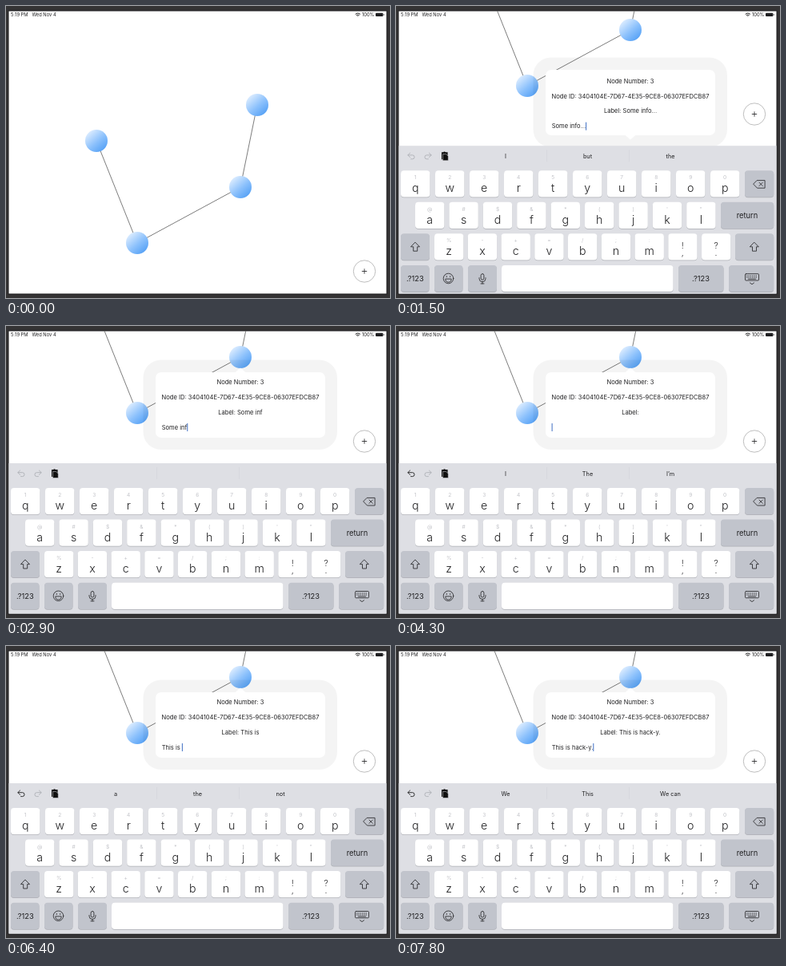
Animation of 480 by 366 pixels, one loop 8000 ms. Source, as an HTML page:

```html
<!DOCTYPE html>
<html lang="en">
<head>
<meta charset="utf-8">
<title>Node label editor</title>
<style>
  html, body { margin: 0; width: 100%; height: 100%; overflow: hidden; background: #343334; }
  svg { display: block; width: 100%; height: 100%; font-family: Inter, Roboto, sans-serif; fill: #202022; }
  .mid { text-anchor: middle; }
  .line { fill: none; stroke: #2a2a2c; stroke-linecap: round; stroke-linejoin: round; }
  #status { font-size: 5.75px; }
  #links { fill: none; stroke: #444; stroke-width: .7; }
  #content { font-size: 7.57px; }
  #hints { font-size: 6.6px; fill: #c2c3c8; }
  #letters { font-size: 14.2px; font-weight: 300; }
  #words { font-size: 7.3px; }
  .label { font-size: 9.3px; }
</style>
</head>
<body>
<svg viewBox="0 0 480 366">
  <defs>
    <linearGradient id="ball" x1=".1" y1=".08" x2=".85" y2=".95">
      <stop offset="0" stop-color="#e3f0ff"/>
      <stop offset=".55" stop-color="#8cc1fc"/>
      <stop offset="1" stop-color="#529ff5"/>
    </linearGradient>
    <clipPath id="screen"><rect x="3.5" y="6.5" width="472" height="354"/></clipPath>
    <clipPath id="cardClip"><rect x="187" width="212" height="82" rx="7"/></clipPath>
  </defs>
  <rect width="480" height="366" fill="#343334"/>
  <rect x="2.5" y="5.5" width="474" height="356" fill="#1d1d1e"/>
  <g clip-path="url(#screen)">
    <rect x="3" y="6" width="473" height="355" fill="#fff"/>
    <g id="scene">
      <path id="links"/>
      <g id="nodes" fill="url(#ball)"></g>
      <circle cx="448" cy="332.5" r="13.7" fill="#fff" stroke="#a8a8a8" stroke-width=".75"/>
      <path class="line" stroke-width=".85" d="M445.2 332.5h5.6M448 329.7v5.6"/>
    </g>

    <g id="popover">
      <rect x="171.5" y="-15.5" width="242.5" height="112.5" rx="22" fill="#000" opacity=".045"/>
      <path id="arrow" fill="#fff"/>
      <rect x="187" width="212" height="82" rx="7" fill="#fff"/>
      <g clip-path="url(#cardClip)">
        <g id="content">
          <text class="mid" x="293" y="15.4">Node Number: 3</text>
          <text class="mid" x="293" y="34">Node ID: 3404104E-7D67-4E35-9CE8-06307EFDCB87</text>
          <text class="mid" x="293" y="52.7" id="label"></text>
          <text x="194.7" y="71.8" id="field"></text>
          <rect id="caret" y="64" width="1" height="10" fill="#3f6fc4"/>
        </g>
      </g>
    </g>

    <g id="keyboard">
      <rect x="3" y="172" width="473" height="190" fill="#dedfe4"/>
      <path d="M188.5 177v15M291.5 177v15" stroke="#d5d6db" stroke-width=".7"/>
      <path id="undo" class="line" stroke-width=".9" d="M17.6 181l-2.8 2.7 2.8 2.7M15 183.7h5.6a2.4 2.4 0 0 1 0 4.9h-2"/>
      <path class="line" style="stroke:#aeb0b6" stroke-width=".9" d="M41.4 181l2.8 2.7-2.8 2.7M44 183.7h-5.6a2.4 2.4 0 0 0 0 4.9h2"/>
      <path d="M57 180h2q1.5-1.3 3 0h2.6v9h-7.6z" fill="#111"/>
      <path d="M58.5 182.5h4.2l2.6 2.6v5.4h-6.8z" fill="#111" stroke="#dedfe4" stroke-width=".5"/>
      <g id="words" class="mid"></g>
      <g id="keys"></g>
      <g id="hints" class="mid"></g>
      <g id="letters" class="mid"></g>
      <g class="mid label">
        <text x="439" y="263">return</text>
        <text x="23.8" y="341.8">.?123</text>
        <text x="381" y="341.8">.?123</text>
      </g>
      <g class="line" stroke-width=".85">
        <path d="M451.5 215.4h9.6v9.6h-9.6l-4.6-4.8zM454 218l4.3 4.3m0-4.3l-4.3 4.3"/>
        <path d="M24.2 293.2l5.3 5.4h-2.8v5.4h-5v-5.4h-2.8z"/>
        <path d="M448 293.2l5.3 5.4h-2.8v5.4h-5v-5.4h-2.8z"/>
        <circle cx="65.5" cy="338.3" r="6.3"/>
        <path d="M61.8 339.3a3.7 3.7 0 0 0 7.4 0zM63.3 335.5v1M67.7 335.5v1"/>
        <rect x="106.1" y="332.5" width="3.8" height="7.5" rx="1.9"/>
        <path d="M104 337.5v1a4 4 0 0 0 8 0v-1M108 342.5v2.3M106 344.8h4"/>
        <rect x="436.5" y="332.5" width="17" height="8.3" rx="1"/>
        <path d="M438.5 335h13M438.5 337h13" stroke-dasharray=".5 1.8"/>
        <path d="M440.5 339h9M442.5 343.8l2.5 1.8 2.5-1.8"/>
      </g>
    </g>

    <g id="status">
      <text x="6" y="13">5:19 PM</text>
      <text x="32.5" y="13">Wed Nov 4</text>
      <path class="line" stroke-width="1" d="M437 10q2.8-2.4 5.6 0M438.3 11.5q1.5-1.2 3 0M439.8 12.8v.1"/>
      <text x="445" y="13">100%</text>
      <rect x="462" y="8.8" width="9.4" height="4.3" rx="1.1"/>
      <rect x="471.9" y="10.1" width=".7" height="1.6"/>
    </g>
  </g>
</svg>

<script>
const LOOP = 8000, STEP = 100;
const $ = id => document.getElementById(id);

function add(parent, tag, attrs, text) {
  const el = document.createElementNS("http://www.w3.org/2000/svg", tag);
  for (const name in attrs) el.setAttribute(name, attrs[name]);
  if (text) el.textContent = text;
  parent.append(el);
  return el;
}

const nodes = [[113, 169], [164, 297], [293, 227], [314, 124]];
$("links").setAttribute("d", "M" + nodes.join("L"));
for (const [cx, cy] of nodes) add($("nodes"), "circle", { cx, cy, r: 14 });

function addKey(x, y, width, fill = "#fff") {
  add($("keys"), "rect", { x, y: y + .9, width, height: 33.2, rx: 4, fill: "#adafb5" });
  return add($("keys"), "rect", { x, y, width, height: 33.2, rx: 4, fill });
}

const GREY = "#c1c4cc";
const letters = [];
const rows = [
  { keys: "qwertyuiop", hints: "1234567890", x: 6, y: 203, pitch: 43 },
  { keys: "asdfghjkl", hints: "@#$&*()'\"", x: 24, y: 242.5, pitch: 42.4 },
  { keys: "zxcvbnm", hints: "%-+=/;:", x: 48, y: 282, pitch: 41.75 }
];
for (const { keys, hints, x, y, pitch } of rows) {
  [...keys].forEach((key, i) => {
    const left = x + i * pitch, mid = left + 18.2;
    addKey(left, y, 36.4);
    add($("hints"), "text", { x: mid, y: y + 11.3 }, hints[i]);
    letters.push(add($("letters"), "text", { x: mid, y: y + 27 }, key));
  });
}
[["!", ","], ["?", "."]].forEach(([upper, lower], i) => {
  const left = 340.3 + i * 41.75, x = left + 18;
  addKey(left, 282, 36.2);
  add($("letters"), "text", { x, y: 301, "font-size": 10.5 }, upper);
  add($("letters"), "text", { x, y: 310, "font-size": 10.5 }, lower);
});
addKey(436, 203, 36.2, GREY);
addKey(406, 242.5, 66.2, GREY);
const shifts = [addKey(6, 282, 36, GREY), addKey(424, 282, 48.2, GREY)];
for (const [x, width] of [[6, 35.5], [48, 35.5], [90, 36], [353, 56.5], [416, 56.2]]) addKey(x, 321.7, width, GREY);
addKey(132, 321.7, 214.5);

const words = [137, 239.5, 343].map(x => add($("words"), "text", { x, y: 187.6 }));

// Timelines of [time, value]
const typed = [
  [0, "Some info..."], [2300, "Some info.."], [2700, "Some info."], [2800, "Some info"],
  [2900, "Some inf"], [3000, "Some in"], [3200, "Some i"], [3400, "Some "], [3500, "Some"],
  [3600, "Som"], [4000, "So"], [4100, "S"], [4300, ""], [4700, "T"], [4900, "Th"],
  [5000, "Thi"], [5100, "This"], [5300, "This "], [5800, "This i"], [6000, "This is"],
  [6200, "This is "], [6500, "This is h"], [6700, "This is ha"], [7000, "This is hac"],
  [7100, "This is hack"], [7300, "This is hack-"], [7400, "This is hack-y"], [7500, "This is hack-y."]
];
const suggested = [
  [0, "I,but,the"], [2300, ",,"], [3400, "I,but,the"], [3600, ",,"], [4300, "I,The,I’m"],
  [4700, ",,"], [5100, "This,This’s,Thistle"], [5400, "is,app,game"], [5800, "is,in,it"],
  [6200, "a,the,not"], [6500, "had,have,has"], [7100, "hack,hacks,hacked"],
  [7300, ",,"], [7600, "We,This,We can"]
];
const sceneShift = [[1100, 0], [1200, -35], [1300, -105], [1400, -168], [1500, -197], [1600, -200], [1900, -188]];
const keyboardDrop = [[1100, 190], [1200, 162], [1300, 99], [1400, 30], [1500, 3.2], [1600, 0]];
const contentDrop = [[1100, 0], [1200, 35], [1300, 15], [1400, 6], [1500, 1.7], [1700, 0]];
const cardTop = [[1100, 125], [1200, 80], [1600, 80], [1800, 58]];

const held = (track, t) => track.findLast(([time]) => time <= t)[1];
function tween(track, t) {
  const next = track.findIndex(([time]) => time > t);
  if (next < 0) return track.at(-1)[1];
  if (next === 0) return track[0][1];
  const [[t0, a], [t1, b]] = track.slice(next - 1, next + 1);
  return a + (b - a) * (t - t0) / (t1 - t0);
}
const moveY = (id, y) => $(id).setAttribute("transform", `translate(0 ${y})`);
const within = (t, from, to) => t >= from && t < to;

function render(t) {
  moveY("scene", tween(sceneShift, t));
  moveY("keyboard", tween(keyboardDrop, t));
  moveY("popover", tween(cardTop, t));
  moveY("content", tween(contentDrop, t));
  $("popover").style.opacity = tween([[0, 0], [200, 1]], t);
  $("arrow").setAttribute("d", t < 1700 ? "M286 81.5L293 87.5L300 81.5z" : "M286 .5L293 -5.5L300 .5z");

  const text = held(typed, t);
  $("label").textContent = "Label: " + text;
  $("field").textContent = text.replace(/ /g, "\u00a0");
  $("caret").setAttribute("x", 194.6 + $("field").getComputedTextLength());
  $("caret").style.display = t < 1400 ? "none" : "";

  held(suggested, t).split(",").forEach((word, i) => words[i].textContent = word);
  $("words").style.opacity = tween([[1200, 0], [1300, .4], [1500, 1], [7500, 1], [7501, .3], [7800, 1]], t);
  $("undo").style.stroke = t < 3200 ? "#aeb0b6" : "#222";

  const upper = within(t, 4500, 4700);
  for (const letter of letters) {
    letter.textContent = upper ? letter.textContent.toUpperCase() : letter.textContent.toLowerCase();
  }
  for (const key of shifts) key.setAttribute("fill", upper ? "#fff" : GREY);
  $("keyboard").style.display = t < 1200 || within(t, 6700, 7000) ? "none" : "";
}

const start = performance.now();
function tick() {
  const t = (performance.now() - start) % LOOP;
  render(Math.floor(t / STEP) * STEP);
  requestAnimationFrame(tick);
}
tick();
</script>
</body>
</html>
```
